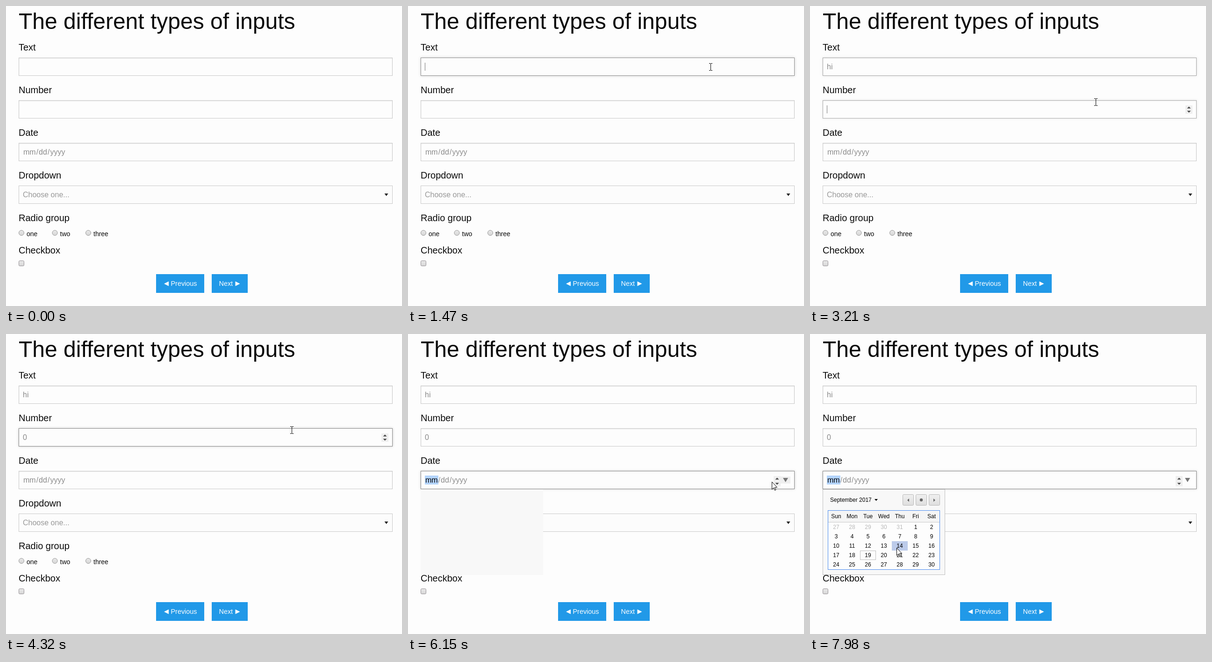
An HTML page for the animation above (8 s loop, 847 by 640 pixels).

```html
<!DOCTYPE html>
<html lang="en">
<head>
<meta charset="utf-8">
<title>The different types of inputs</title>
<style>
html, body { margin: 0; width: 100%; height: 100%; overflow: hidden; background: #fdfdfd; }
.field { position: absolute; left: 27px; width: 800px; height: 39px; box-sizing: border-box;
  border: 1px solid #cacaca; background: #fdfdfd; }
.field:last-of-type { background: #fcfcfc; }
svg { position: absolute; left: 0; top: 0; font-family: "Liberation Sans", Arial, sans-serif; }
</style>
</head>
<body>
<svg id="stage" width="847" height="640" viewBox="0 0 847 640"></svg>
<script>
const LOOP = 8000, STEP = 30, BLINK = 475;
const LEFT = 27, TOP = 110, PITCH = 91, HEIGHT = 39;
const GREY = '#8a8a8a', INK = '#0a0a0a', BLUE = '#2199e8';
const stage = document.getElementById('stage');

function el(tag, attrs, parent = stage, body) {
  const node = document.createElementNS('http://www.w3.org/2000/svg', tag);
  for (const key in attrs) node.setAttribute(key, attrs[key]);
  if (body !== undefined) node.textContent = body;
  return parent.appendChild(node);
}
const text = (x, y, size, fill, body, parent, anchor = 'start') =>
  el('text', { x, y, fill, 'font-size': size, 'text-anchor': anchor }, parent, body);
const rect = (x, y, width, height, fill, parent, more) =>
  el('rect', { x, y, width, height, fill, ...more }, parent);
const frame = (x, y, w, h, stroke, fill, parent, more) =>
  rect(x + .5, y + .5, w - 1, h - 1, fill, parent, { stroke, ...more });
const path = (d, fill, parent, more) => el('path', { d, fill, ...more }, parent);
// Triangles given by the middle of their flat side; a negative length flips them
const down = (x, y, half, len, fill, parent) => path(`M${x - half} ${y}h${2 * half}l${-half} ${len}z`, fill, parent);
const right = (x, y, half, len, fill, parent) => path(`M${x} ${y - half}v${2 * half}l${len} ${-half}z`, fill, parent);
const group = () => el('g', {});
const show = (node, on) => node.setAttribute('visibility', on ? 'visible' : 'hidden');
const fieldTop = i => TOP + PITCH * i;

function gradient(id, from, to) {
  const g = el('linearGradient', { id, x1: 0, y1: 0, x2: 0, y2: 1 });
  el('stop', { offset: 0, 'stop-color': from }, g);
  el('stop', { offset: 1, 'stop-color': to }, g);
}
gradient('knob', '#e9e9e9', '#d6d6d6');
gradient('button', '#f0f0f0', '#dedede');

// Form
text(LEFT, 49, 48, INK, 'The different types of inputs');
const boxes = ['Text', 'Number', 'Date', 'Dropdown'].map((name, i) => {
  text(LEFT, fieldTop(i) - 15, 20, INK, name);
  const box = document.createElement('div');
  box.className = 'field';
  box.style.top = fieldTop(i) + 'px';
  document.body.insertBefore(box, stage);
  return box;
});
const inputs = boxes.slice(0, 3);
text(36, 408, 16, '#999', 'Choose one...');
down(813.5, 400, 4, 5.5, '#222');

text(LEFT, 459, 20, INK, 'Radio group');
['one', 'two', 'three'].forEach((name, i) => {
  const x = 33 + 71.5 * i;
  el('circle', { cx: x, cy: 484, r: 5.5, fill: 'url(#knob)', stroke: '#9a9a9a' });
  text(x + 11, 491, 14, INK, name);
});
text(LEFT, 528, 20, INK, 'Checkbox');
frame(27, 543, 12, 12, '#959095', 'url(#knob)', stage, { rx: 2 });

rect(321, 572, 103, 40, BLUE);
rect(440, 572, 77, 40, BLUE);
right(348, 592.5, 5, -10, '#fefefe');
right(490.5, 592.5, 5, 10, '#fefefe');
text(352.5, 597, 14.4, '#fefefe', 'Previous');
text(455.5, 597, 14.4, '#fefefe', 'Next');

// Field contents
const values = [0, 1].map(i => text(36, fieldTop(i) + 25, 16, GREY, ''));
const caret = rect(0, 0, 1, 17, '#777');
const picked = rect(36, 302, 29, 19, '#b3d4fd');
const date = text(37, 317, 16, GREY, '');
date.setAttribute('dx', '0 0 1 1 0 1 1');
const month = el('tspan', {}, date, 'mm');
el('tspan', {}, date, '/dd/yyyy');

function spinner(x, top, height, gap) {
  const g = group(), mid = x + 7.5, y = top + height / 2;
  rect(x, top, 15, height, '#efefef', g);
  down(mid, y - gap, 4, -4, '#444', g);
  down(mid, y + gap, 4, 4, '#444', g);
  return g;
}
const numberSpin = spinner(803, 212, 18, 2.5);
const dateSpin = spinner(782, 303, 22, 3.5);
const dropHover = rect(797, 304, 21, 15, '#efefef');
const dropMark = down(807.5, 307, 5.5, 9, '#777');

// Calendar
const CELL_W = 34, CELL_H = 20, GRID_X = 39, GRID_Y = 402;
const popup = group(), sheet = group();
rect(27, 332, 262, 182, '#f8f8f8', popup);
frame(27, 331, 262, 183, '#bfbfbf', '#f8f8f8', sheet);
text(43, 358, 12, '#000', 'September 2017', sheet);
down(141.5, 352, 3.5, 4, '#000', sheet);
[198, 226, 254].forEach(x => frame(x, 342, 24, 24, '#b8b8b8', 'url(#button)', sheet, { rx: 2 }));
right(212, 354.5, 3.5, -4, '#666', sheet);
el('circle', { cx: 238, cy: 354, r: 3.2, fill: '#666' }, sheet);
right(264, 354.5, 3.5, 4, '#666', sheet);
frame(38, 376, 240, 127, '#4a8bf0', '#fdfdfd', sheet);
rect(GRID_X, 377, 238, 24, '#f5f5f5', sheet);
rect(GRID_X, 401, 238, 1, '#c8c8c8', sheet);
const hover = rect(0, 0, CELL_W, CELL_H, '#e3eafa', sheet);
frame(107, 462, CELL_W, CELL_H, '#bfbfbf', 'none', sheet);
const cellText = (col, y, fill, body) =>
  text(GRID_X + 17 + CELL_W * col, y, 12, fill, body, sheet, 'middle');
['Sun', 'Mon', 'Tue', 'Wed', 'Thu', 'Fri', 'Sat'].forEach((day, i) => cellText(i, 393, '#000', day));
for (let i = 0; i < 35; i++) {
  const day = i - 4, y = GRID_Y + 14 + CELL_H * Math.floor(i / 7);
  cellText(i % 7, y, day < 1 ? '#b8b8b8' : '#000', day < 1 ? day + 31 : day);
}

// Pointer
const pointer = group();
const arrow = path('M.5 .5V16.5L4.3 13L6.6 18.5L8.8 17.6L6.5 12.2H11.5Z', '#fff', pointer, { stroke: '#000' });
const beam = path('M-3 -7.5h3M1 -7.5h3M.5 -7V7M-3 7.5h3M1 7.5h3', 'none', pointer, { stroke: '#000' });

const flat = u => u, easeIn = u => u ** 2.5, easeOut = u => 1 - (1 - u) ** 3;
const smooth = u => u * u * (3 - 2 * u);
const clamp = u => Math.min(1, Math.max(0, u));

// Each stroke bends from the last resting place to `to`, pulled towards `via`
const strokes = [
  { begin: 390, end: 1080, via: [735, 75], to: [647, 130], ease: u => 1 - (1 - u) ** 2 },
  { begin: 2640, end: 3120, via: [628, 165], to: [611, 205], ease: flat },
  { begin: 4620, end: 5010, via: [606, 262], to: [674, 295], ease: flat },
  { begin: 5250, end: 5640, via: [725, 313], to: [803, 315], ease: easeOut },
  { begin: 6060, end: 6270, via: [700, 312], to: [570, 389], ease: easeIn },
  { begin: 6450, end: 6780, via: [330, 430], to: [232, 419], ease: easeOut },
  { begin: 6780, end: 7080, via: [225, 440], to: [184, 463], ease: smooth },
  { begin: 7230, end: 7800, via: [182, 457], to: [185, 456], ease: smooth }
];

function place(t) {
  let at = [850, 40];
  for (const s of strokes) {
    if (t < s.begin) break;
    const k = s.ease(clamp((t - s.begin) / (s.end - s.begin)));
    at = at.map((p, i) => (1 - k) ** 2 * p + 2 * k * (1 - k) * s.via[i] + k * k * s.to[i]);
  }
  return at.map(Math.round);
}

// Clicks and key presses: which field has the caret and what it holds
const events = [
  { at: 1265, field: 0, value: '' },
  { at: 1980, field: 0, value: 'h' },
  { at: 2040, field: 0, value: 'hi' },
  { at: 3090, field: 1, value: '' },
  { at: 3840, field: 1, value: '0' },
  { at: 5760, field: 2, value: '' }
];
const focusAt = i => (events.find(e => e.field === i) || { at: LOOP }).at;
const glow = (t, i) => smooth(clamp((t - focusAt(i)) / 250));

function draw(t) {
  const [x, y] = place(t);
  const over = i => x >= LEFT && x < 827 && y >= fieldTop(i) && y < fieldTop(i) + HEIGHT;
  const typing = over(0) || over(1);
  show(arrow, !typing);
  show(beam, typing);
  pointer.setAttribute('transform', `translate(${x} ${y})`);

  inputs.forEach((box, i) => {
    const k = glow(t, i) - glow(t, i + 1), c = Math.round(202 - 64 * k);
    box.style.borderColor = `rgb(${c},${c},${c})`;
    box.style.boxShadow = `inset 0 1px 2px rgba(10,10,10,${.1 * (1 - k)}), 0 0 5px rgba(202,202,202,${k})`;
  });

  const past = events.filter(e => e.at <= t), last = past[past.length - 1];
  values.forEach((node, i) => {
    const entry = past.filter(e => e.field === i).pop();
    node.textContent = entry ? entry.value : '';
  });
  const field = last ? last.field : -1;
  const inText = field === 0 || field === 1;
  show(caret, inText && (t - last.at) % (2 * BLINK) < BLINK);
  if (inText) {
    const width = last.value ? values[field].getComputedTextLength() : 0;
    caret.setAttribute('x', 36 + Math.round(width));
    caret.setAttribute('y', fieldTop(field) + 11);
  }

  const dated = field === 2, dateTools = dated || over(2);
  show(picked, dated);
  month.setAttribute('fill', dated ? '#000' : GREY);
  show(numberSpin, field === 1 || over(1));
  show(dateSpin, dateTools);
  show(dropMark, dateTools);
  show(dropHover, over(2) && x >= 775);

  const open = t >= 6210;
  show(popup, t >= 6090 && !open);
  show(sheet, open);
  const col = Math.floor((x - GRID_X) / CELL_W), row = Math.floor((y - GRID_Y) / CELL_H);
  const inGrid = col >= 0 && col < 7 && row >= 0 && row < 5;
  show(hover, open && inGrid && row * 7 + col > 4);
  hover.setAttribute('x', GRID_X + CELL_W * col);
  hover.setAttribute('y', GRID_Y + CELL_H * row);
  hover.setAttribute('fill', t >= 7980 ? '#bccbea' : '#e3eafa');
}

const start = performance.now();
function tick() {
  const t = (performance.now() - start) % LOOP;
  draw(Math.floor(t / STEP) * STEP);
  requestAnimationFrame(tick);
}
tick();
</script>
</body>
</html>
```
